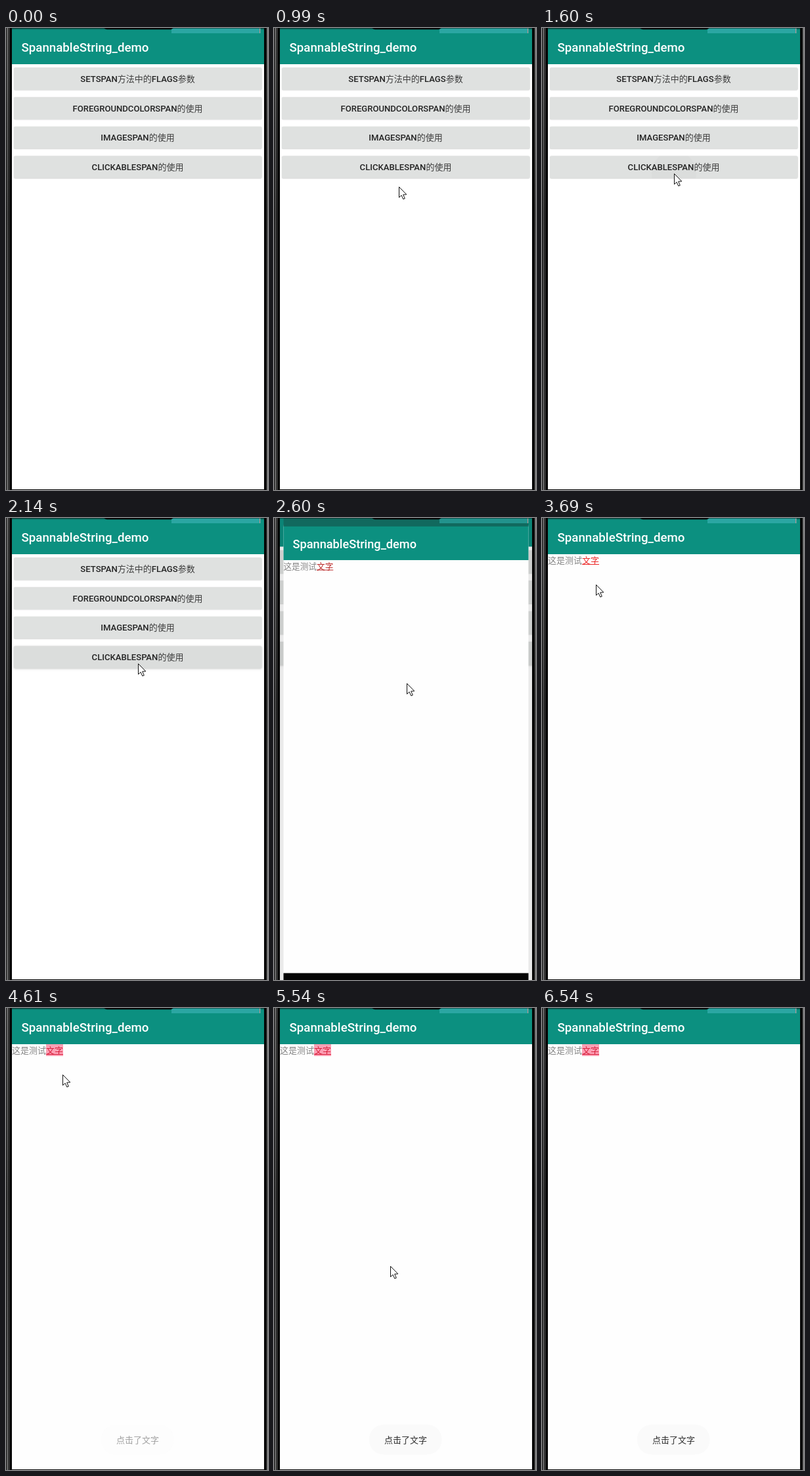
These frames come from a looping animation (399 px wide and 702 px high, 7240 ms). An HTML page with a canvas:

```html
<!DOCTYPE html>
<html lang="zh-CN">
<head>
<meta charset="utf-8">
<title>SpannableString_demo</title>
<style>
html, body { margin: 0; width: 100%; height: 100%; overflow: hidden; background: #fff; }
canvas { display: block; width: 399px; height: 702px; }
</style>
</head>
<body>
<canvas id="stage"></canvas>
<script>
const W = 399, H = 702, LOOP = 7240;
const canvas = document.getElementById('stage');
const dpr = window.devicePixelRatio || 1;
canvas.width = W * dpr;
canvas.height = H * dpr;
const g = canvas.getContext('2d');

const LATIN = 'Roboto, sans-serif';
const CJK = '400 13px "Noto Sans CJK SC", "Noto Sans CJK", sans-serif';
const TEAL = '#0c9080', STATUS = '#11695e';
const ENTER = 200, PRESS = 1590, OPEN = 2430, SELECT = 3990, TOAST = 4500, LEAVE = 6530;

// Where the hand turns or rests
const PATH = [
  { t: 200, x: 210, y: 591 },
  { t: 640, x: 164, y: 345 },
  { t: 990, x: 190, y: 241 },
  { t: 1450, x: 201, y: 221 },
  { t: 2140, x: 201, y: 221 },
  { t: 2600, x: 202, y: 251 },
  { t: 3140, x: 82, y: 167 },
  { t: 3690, x: 82, y: 101 },
  { t: 3980, x: 77, y: 66 },
  { t: 4520, x: 76, y: 66 },
  { t: 5230, x: 151, y: 337 },
  { t: 5540, x: 177, y: 392 },
  { t: 6000, x: 235, y: 508 },
  { t: 6540, x: 340, y: 720 }
];
const ARROW = new Path2D('M0 0V16L3.6 12.7L6.3 18.6L8.8 17.6L6.2 11.7L11.3 11.5Z');

const BUTTONS = [
  ['SETSPAN', '方法中的', 'FLAGS', '参数'],
  ['FOREGROUNDCOLORSPAN', '的使用'],
  ['IMAGESPAN', '的使用'],
  ['CLICKABLESPAN', '的使用']
];

const clamp = v => Math.max(0, Math.min(1, v));
const mix = (a, b, k) => a + (b - a) * k;

function pointerAt(t) {
  const i = PATH.findIndex(p => p.t > t);
  const a = PATH[i - 1], b = PATH[i];
  const k = (t - a.t) / (b.t - a.t);
  return [mix(a.x, b.x, k), mix(a.y, b.y, k)];
}

function rect(x, y, w, h, fill) {
  g.fillStyle = fill;
  g.fillRect(x, y, w, h);
}

function roundPath(x, y, w, h, r) {
  g.beginPath();
  g.roundRect(x, y, w, h, r);
}

function text(str, x, y, font, fill) {
  g.font = font;
  g.fillStyle = fill;
  g.fillText(str, x, y);
}

function scaled(s, draw) {
  g.save();
  g.translate(201, 370);
  g.scale(s, s);
  g.translate(-201, -370);
  draw();
  g.restore();
}

function appBar() {
  rect(9, -20, 384, 75, TEAL);
  rect(9, -20, 384, 22.3, STATUS);
  text('SpannableString_demo', 23.5, 36, '500 18.7px ' + LATIN, '#fff');
}

function buttonLabel(runs, y) {
  const isLatin = s => /[A-Z]/.test(s);
  const font = s => (isLatin(s) ? '500 13.1px ' + LATIN : CJK);
  const widths = runs.map(s => { g.font = font(s); return g.measureText(s).width; });
  let x = 200.5 - widths.reduce((a, b) => a + b) / 2;
  runs.forEach((s, i) => {
    text(s, x, y, font(s), isLatin(s) ? '#242424' : '#3c3c3c');
    x += widths[i];
  });
}

function button(runs, y, press) {
  g.save();
  g.shadowColor = 'rgba(0,0,0,0.2)';
  g.shadowBlur = (1.2 + press * 2) * dpr;
  g.shadowOffsetY = (0.3 + press * 0.6) * dpr;
  roundPath(12, y, 377.5, 34, 2);
  g.fillStyle = '#dfe1e0';
  g.fill();
  g.restore();
  if (press) {
    g.save();
    roundPath(12, y, 377.5, 34, 2);
    g.clip();
    g.beginPath();
    g.arc(201, 221, 25 + press * 185, 0, 7);
    g.fillStyle = 'rgba(0,0,0,0.018)';
    g.fill();
    g.restore();
  }
  buttonLabel(runs, y + 21.6);
}

function menuScreen(t) {
  rect(9, 0, 384, 701, '#fff');
  appBar();
  const press = clamp((t - PRESS) / 220);
  BUTTONS.forEach((runs, i) => button(runs, 60.2 + i * 44.75, i === 3 ? press : 0));
}

function spanScreen(t, e) {
  const selected = t >= SELECT;
  const red = selected ? '#d8203c' : `rgb(${mix(90, 236, e * e)},38,38)`;
  rect(9, 0, 384, 701, '#fefefe');
  rect(9, 701, 384, 20, '#050505');
  appBar();
  if (selected) rect(61, 55, 26, 18, '#fc9fb4');
  text('这是测试', 9, 69, CJK, '#858585');
  text('文字', 61, 69, CJK, red);
  rect(61, 70, 26, 1, red);
}

function toast(t) {
  g.globalAlpha = clamp((t - TOAST) / 250);
  roundPath(145, 633, 110.5, 45.5, 22);
  g.fillStyle = '#fafafa';
  g.fill();
  text('点击了文字', 168, 661, CJK, '#2e2e2e');
  g.globalAlpha = 1;
}

function topEdge(e) {
  g.globalAlpha = mix(0.45, 1, e ** 4);
  rect(252, 0, 136, 8, '#2ba6a3');
  g.globalAlpha = 1;
  rect(386, 0, 1, 8, '#b9928c');
  rect(9, 0, 384, 1, 'rgba(0,20,18,0.5)');
  roundPath(148, -10, 108, 12.3, 6);
  g.fillStyle = '#050808';
  g.fill();
}

function phoneFrame() {
  const metal = g.createLinearGradient(0, 0, 0, H);
  metal.addColorStop(0, '#777');
  metal.addColorStop(0.4, '#4c4c4c');
  metal.addColorStop(1, '#777');
  rect(0, 0, 9, H, '#040404');
  rect(1, 0, 2, H, metal);
  rect(4, 0, 1, H, metal);
  rect(393, 0, 6, H, '#040404');
  rect(397, 0, 2, H, metal);
}

function pointer(x, y) {
  g.save();
  g.translate(Math.round(x) + 0.5, Math.round(y) + 0.5);
  g.fillStyle = '#fff';
  g.fill(ARROW);
  g.strokeStyle = '#111';
  g.lineWidth = 1;
  g.stroke(ARROW);
  g.restore();
}

function render(t) {
  g.setTransform(dpr, 0, 0, dpr, 0, 0);
  const opening = t >= OPEN;
  // The new screen grows in, slowing toward full size
  const e = !opening ? 0 : t > 2960 ? 1 : 1 - Math.exp(-0.0097 * (t - OPEN));

  g.save();
  g.beginPath();
  g.rect(9, 0, 384, H);
  g.clip();
  rect(0, 0, W, H, '#000');
  if (e < 1) {
    scaled(1 + 0.045 * e, () => menuScreen(t));
    rect(9, 0, 384, H, `rgba(0,0,0,${0.1 * e})`);
  }
  if (opening) {
    g.globalAlpha = clamp((t - OPEN) / 90);
    scaled(mix(0.85, 1, e), () => spanScreen(t, e));
    g.globalAlpha = 1;
  }
  topEdge(opening ? e : 1);
  if (t >= TOAST) toast(t);
  g.restore();

  phoneFrame();
  if (t >= ENTER && t < LEAVE) pointer(...pointerAt(t));
}

const start = performance.now();
function tick() {
  render((performance.now() - start) % LOOP);
  requestAnimationFrame(tick);
}
tick();
</script>
</body>
</html>
```
